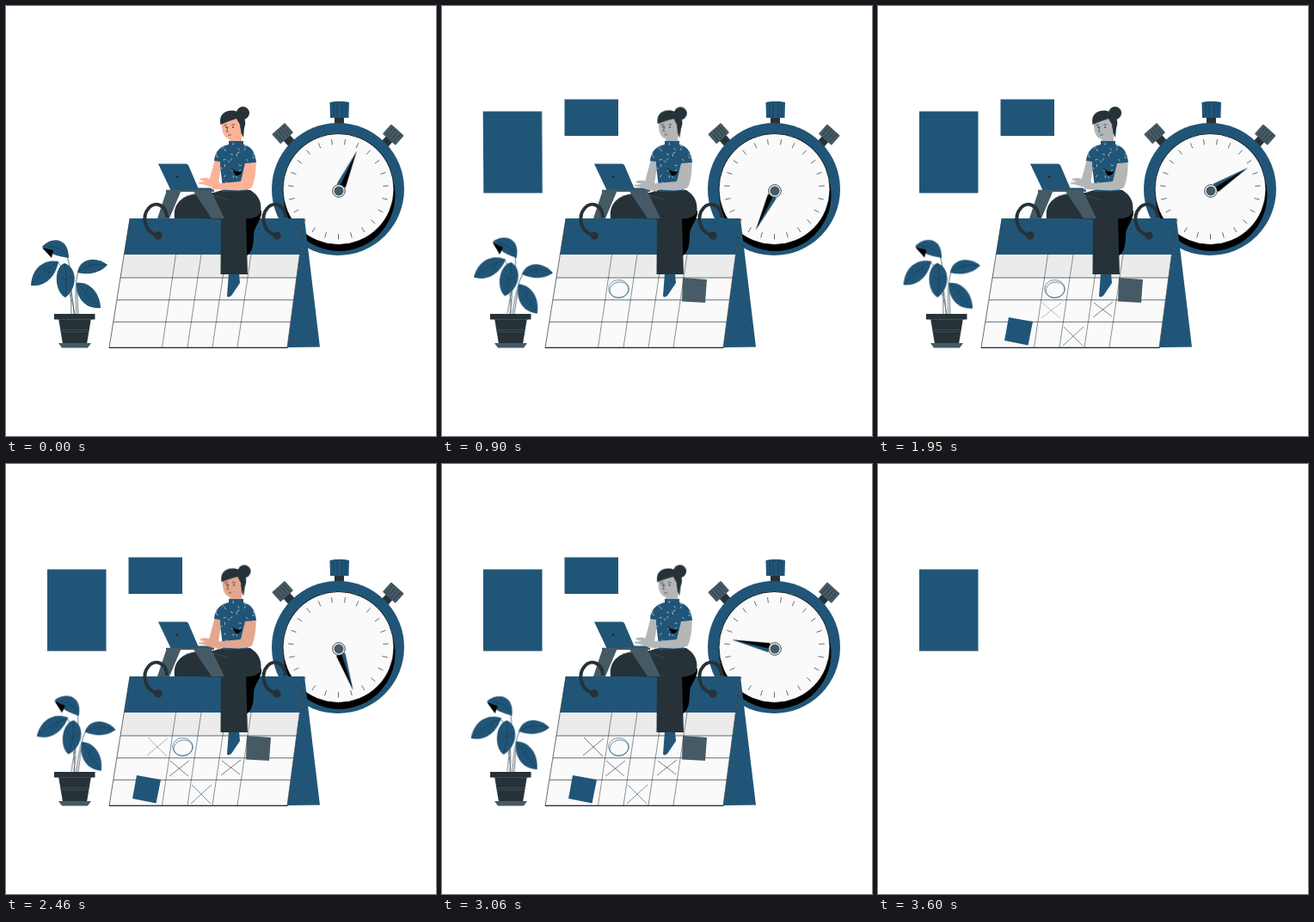
Write an HTML page that moves like this. It is 500x500 px and loops after 3.63 s.

```html
<!DOCTYPE html>
<html lang="en">
<head>
<meta charset="utf-8">
<title>Planning</title>
<style>
html, body { margin: 0; width: 100%; height: 100%; overflow: hidden; background: #fff; }
svg { display: block; width: 100vw; height: 100vh; }
.blue { fill: #215577; }
.dark { fill: #263238; }
.grey { fill: #455a64; }
.skin { fill: #fbb397; }
.line { fill: none; stroke: #263238; stroke-width: .7; }
.mark { fill: none; stroke: #263238; stroke-width: .6; }
.ink { stroke: #215577; }
.vein { fill: none; stroke: #17384f; stroke-width: .6; }

.scene, .hand, .sway, .head, .type, .skin, .drop, .dash, .mark, .note {
  animation: 3630ms linear infinite;
}
.scene { animation-name: scene; }
.hand { animation-name: spin; transform-origin: 387px 215px; }
.sway { animation-name: sway; transform-origin: 79px 358px; }
.head { animation-name: nod; transform-origin: 268px 160px; }
.type { animation-name: type; }
.skin { animation-name: tone; }
.skin.type { animation-name: tone, type; }
.sway, .head, .type { animation-timing-function: cubic-bezier(.37, 0, .63, 1); }
.drop { animation-name: drop; }
.dash { animation-name: dash; transform-box: fill-box; transform-origin: center; animation-timing-function: ease-out; }
.m1 { animation-name: m1; }
.m2 { animation-name: m2; }
.m3 { animation-name: m3; }
.m4 { animation-name: m4; }
.m5 { animation-name: m5; }
.n1 { animation-name: n1; }
.n2 { animation-name: n2; }

@keyframes scene { 0%, 99.1% { opacity: 1 } 99.11%, to { opacity: 0 } }
@keyframes spin { from { transform: rotate(24deg) } to { transform: rotate(757deg) } }
@keyframes sway { 0%, 49.2%, 98.5%, to { transform: none } 24.6%, 73.8% { transform: rotate(12deg) } }
@keyframes nod { 0%, 49.2%, 98.5%, to { transform: none } 24.6%, 73.8% { transform: rotate(3deg) } }
@keyframes type { 0%, 49.2%, 98.5%, to { transform: none } 24.6%, 73.8% { transform: translateY(3px) } }
@keyframes tone {
  0%, 6.6% { fill: #fbb397 } 6.61%, 60.6% { fill: #b4b6b8 }
  60.61%, 76% { fill: #e3a78f } 76.01%, to { fill: #b4b6b8 }
}
@keyframes drop { 0% { transform: translateY(-30px); opacity: 0 } 18.2%, to { transform: none; opacity: 1 } }
@keyframes dash {
  0%, 14.9% { transform: translateX(-34px) skewX(20deg); opacity: 0 }
  23.1% { transform: skewX(-10deg); opacity: 1 }
  25.9% { transform: skewX(3deg) }
  28.6%, to { transform: none; opacity: 1 }
}
@keyframes m1 { 0%, 2.5% { opacity: 0 } 11.5%, to { opacity: 1 } }
@keyframes n1 { 0%, 12.1% { opacity: 0 } 25%, to { opacity: 1 } }
@keyframes m2 { 0%, 24.8% { opacity: 0 } 33%, to { opacity: 1 } }
@keyframes n2 { 0%, 27.5% { opacity: 0 } 37.2%, to { opacity: 1 } }
@keyframes m3 { 0%, 38.5% { opacity: 0 } 47%, to { opacity: 1 } }
@keyframes m4 { 0%, 49.6% { opacity: 0 } 57.8%, to { opacity: 1 } }
@keyframes m5 { 0%, 62.5% { opacity: 0 } 71%, to { opacity: 1 } }
</style>
</head>
<body>
<svg viewBox="0 0 500 500">
  <defs>
    <path id="shirt" d="M259 157L276 157 276 161C285 163 290 170 291 182L279 184C277 194 278 205 282 215L252 216C252 203 249 193 249 181L242 180C243 169 249 163 259 161Z"/>
    <clipPath id="cut"><use href="#shirt"/></clipPath>
    <g id="ring">
      <path d="M187 246C187 232 174 226 166 235C158 244 160 262 176 267" fill="none" stroke="#263238" stroke-width="4"/>
      <circle cx="177" cy="267" r="4.7" class="dark"/>
    </g>
    <g id="knob">
      <rect x="-5" y="6" width="10" height="11" class="dark"/>
      <rect x="-10" y="-8" width="20" height="15" rx="1" class="grey"/>
      <path d="M-6-7V6M-2-7V6M2-7V6M6-7V6" class="line"/>
    </g>
  </defs>

  <rect class="blue dash" x="48" y="122.500" width="68.500" height="95"/>

  <g class="scene">
    <rect class="blue drop" x="142.500" y="108.500" width="62.500" height="42.500"/>

    <!-- stopwatch -->
    <use href="#knob" transform="translate(322 148.500) rotate(-42)"/>
    <use href="#knob" transform="translate(450 150) rotate(42)"/>
    <rect x="382" y="128" width="11" height="10" class="dark"/>
    <path d="M376.500 112Q388 109.500 399 112L398.500 130H377Z" class="blue"/>
    <path d="M381 112V129M385 112V129M391 112V129M395 112V129" class="vein"/>
    <circle cx="386" cy="213" r="77" class="blue"/>
    <circle cx="387.500" cy="220" r="65"/>
    <circle cx="386.500" cy="213" r="64.500" fill="#fafafa" stroke="#000" stroke-width=".8"/>
    <path id="ticks" class="line"/>
    <g class="hand">
      <path d="M387 164L381.500 208 387 211Z" class="blue"/>
      <path d="M387 164L392.500 208 387 211 386 211Z"/>
    </g>
    <circle cx="387" cy="215" r="7.300" fill="#fafafa" stroke="#263238" stroke-width=".9"/>
    <circle cx="387" cy="215" r="5.500" class="grey"/>

    <!-- calendar -->
    <path d="M347 247L365 396.500 327 397Z" class="blue"/>
    <path d="M144 247H347L327 397.500H120Z" fill="#fafafa"/>
    <path d="M137.300 289H341.400L337.800 316H133Z" fill="#ebebeb"/>
    <path d="M144 247H347L341.400 289H137.300Z" class="blue"/>
    <path d="M144 247L120 397.300H327L347 247M133 316H338M129 341.800H334.500M125 367.300H331" class="line"/>
    <path d="M120 397.300H327.500" stroke="#263238" stroke-width="1.200"/>
    <path d="M197.500 289L181.500 397M227 289L211 397M256 289L240 397M285 289L269 397" class="line" stroke-opacity=".75"/>

    <g class="mark ink m1">
      <ellipse cx="205.500" cy="329" rx="11.800" ry="10.500"/>
      <ellipse cx="206" cy="330" rx="11" ry="9" transform="rotate(-12 206 330)"/>
    </g>
    <path class="grey note n1" d="M280 316L308 318 306 345 279 343.500Z"/>
    <path class="mark ink m2" d="M216 373L238 395M239 373L215 395"/>
    <path class="blue note n2" d="M152 362L180 367 174.500 394.500 147 389Z"/>
    <path class="mark m3" d="M251 345L272 361M273 344L250 362"/>
    <path class="mark m4" d="M191 345L212 363M213 345L190 363"/>
    <path class="mark m5" d="M165 318L187 340M188 319L164 339"/>

    <!-- woman and laptop -->
    <path d="M196 247C194 232 202 221 222 218L258 216 258 247Z" class="dark"/>
    <path d="M278 242L297 238C298 249 288 256 288 266C288 279 286 287 279 291Z"/>
    <path d="M259 311L257 337C258 340 262 338 264 334L272 322 271 311Z" class="blue"/>
    <path d="M252 214H284C294 220 298 229 296 241Q291 247 279 247.500L281 312H249.500L250 248 225 247C224 224 236 218 252 214Z" class="dark"/>
    <path d="M209 221Q235 215 260 226" fill="none" stroke="#455a64" stroke-width=".6"/>

    <path d="M243 178L251 181 247 207 235 208Z" class="skin"/>
    <g class="head">
      <path d="M260 146H274V159Q267 162 260 158Z" class="skin"/>
      <circle cx="275.500" cy="124.500" r="7.500" class="dark"/>
      <path d="M251 132C250 143 252 154 261 155C271 154 275 145 273 131Q261 124 251 132Z" class="skin"/>
      <path d="M249.500 138C247 126 255 121 264 121.500C275 123 281 132 277 142L276 153Q272.500 148 272 138L268 131Q258 134 249.500 138Z" class="dark"/>
      <path d="M253 139l4-1M262 138l4 0M258 140l-1.500 6 2 .5M258 150q3 1 4-1" class="line"/>
      <circle cx="256" cy="141" r=".8"/><circle cx="264" cy="141" r=".8"/>
      <circle cx="271" cy="144" r="2" class="skin"/>
    </g>
    <use href="#shirt" class="blue"/>
    <g clip-path="url(#cut)">
      <path id="dashes" fill="none" stroke="#b9cbd6" stroke-width=".8"/>
      <path d="M262 188Q267 194 274 192Q273 198 267 197Z"/>
    </g>

    <path d="M187 214H204L190 247H176ZM217 214H238L254 247H239Z" class="grey"/>
    <path d="M177 183.500H209.500Q211 183.500 212 185L224 213H191Z" class="blue"/>
    <circle cx="199" cy="198.500" r="1.600" class="dark"/>
    <path d="M191 211.500H238L241 214H191Z" class="blue"/>
    <path d="M186 213.800H242V216H186Z" class="grey"/>

    <path d="M278 183L290.500 182C291 193 289 204 286 211Q283 214 270 214.500L240 213 240 207 273 204Z" class="skin"/>
    <path class="skin type" d="M248 204L234 200Q227 199 225 202L232 204 224 205Q223 207 228 207L237 210 250 213Z"/>

    <use href="#ring"/>
    <use href="#ring" x="138"/>

    <!-- plant -->
    <g class="sway">
      <path d="M76 358C75 335 77 308 71 291M79 358Q77 315 61 299M82 358Q79 325 84 309M80 358Q76 335 69 325M84 358Q83 340 82 322" fill="none" stroke="#455a64" stroke-width=".8"/>
      <g class="blue">
        <path d="M42 280C52 268 73 268 73 293C62 291 50 289 42 280Z"/>
        <path d="M61 297C45 294 30 304 29 325C46 327 58 314 61 297Z"/>
        <path d="M83 310C85 294 104 290 118 301C109 311 95 313 83 310Z"/>
        <path d="M82 322C95 320 109 331 110 351C95 353 81 342 82 322Z"/>
        <path d="M68 299C55 304 56 332 69 339C84 328 83 304 68 299Z"/>
      </g>
      <path d="M42 281L55 284 53 293Z"/>
      <path d="M49 280Q64 279 72 291M61 298Q45 305 30 324M84 309Q98 298 117 301M83 323Q94 335 109 350M68 300Q72 318 69 338M52 303l-3 8M97 298l2 7M95 328l-3 8M63 315l7 4 7-5" class="vein"/>
    </g>
    <path d="M61 363H99L94 393H66Z" class="dark"/>
    <rect x="56" y="358" width="47.500" height="6.500" class="dark"/>
    <path d="M61 392H99L95 397.500H65Z" class="grey"/>
    <path d="M63 376.500H97M63.500 379H96M60 364.500H100" fill="none" stroke="#455a64" stroke-width=".7"/>
  </g>
</svg>
<script>
const draw = (id, d) => document.getElementById(id).setAttribute('d', d);
const polar = (r, a) => `${386.5 + r * Math.sin(a)} ${213 + r * Math.cos(a)}`;

let ticks = '';
for (let i = 0; i < 23; i++) {
  const a = i * 2 * Math.PI / 23;
  ticks += `M${polar(52, a)}L${polar(58.5, a)}`;
}
draw('ticks', ticks);

let dashes = '';
for (let i = 0; i < 48; i++) {
  const x = 243 + (i % 6) * 8.5 + (i * 37 % 5), y = 161 + Math.floor(i / 6) * 7 + (i * 23 % 5);
  const a = i * 2.4;
  dashes += `M${x} ${y}l${3.2 * Math.cos(a)} ${3.2 * Math.sin(a)}`;
}
draw('dashes', dashes);
</script>
</body>
</html>
```
